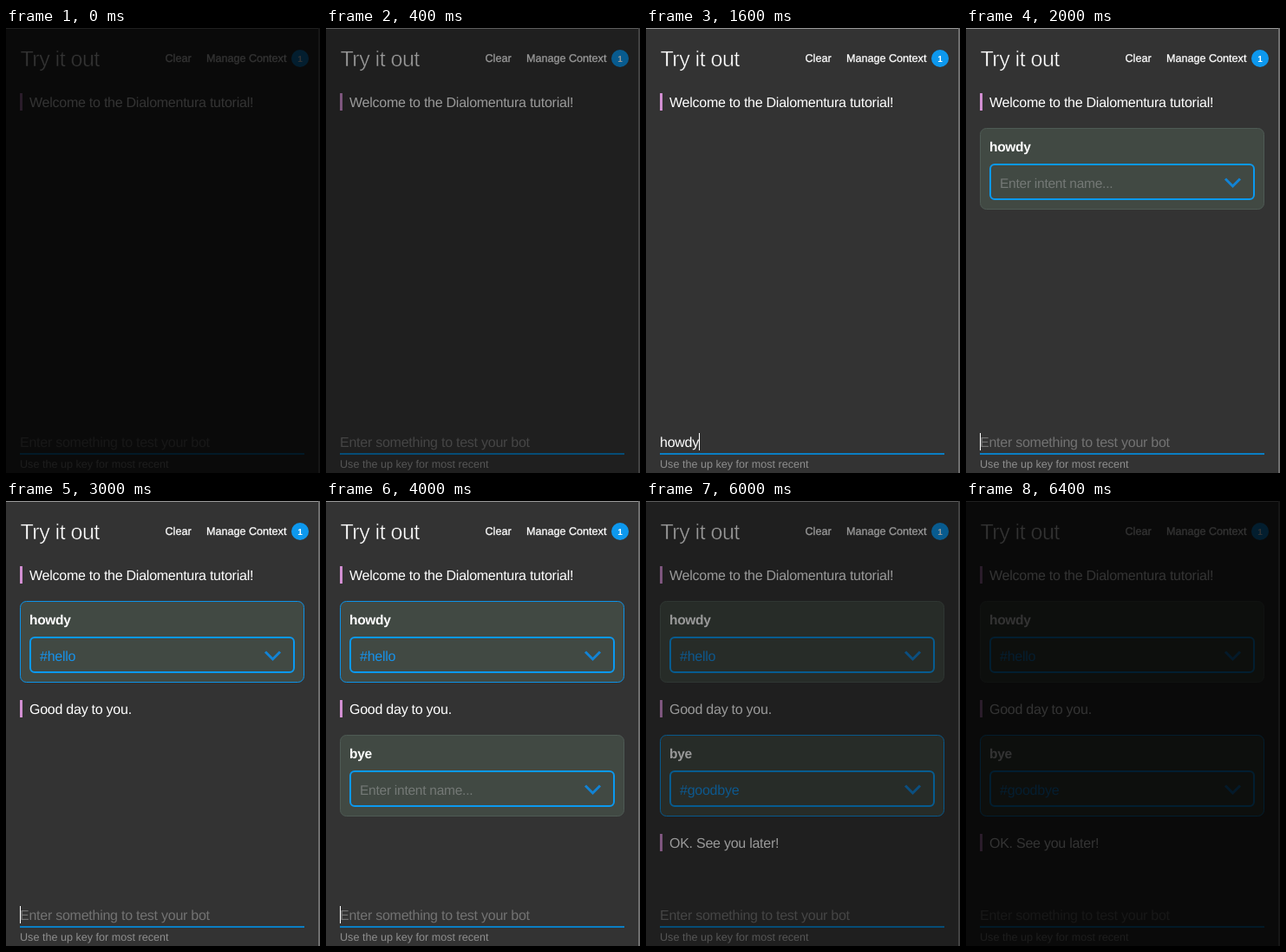
Write an HTML page that moves like this. It is 362x512 px and loops after 6600 ms.

```html
<!DOCTYPE html>
<html lang="en">
<head>
<meta charset="utf-8">
<title>Try it out</title>
<style>
  html, body { margin: 0; width: 100%; height: 100%; overflow: hidden; background: #000; }
  svg { display: block; width: 362px; height: 512px; }
  text {
    font: 16px "Liberation Sans", Arial, sans-serif;
    letter-spacing: -.25px;
    text-rendering: geometricPrecision;
    fill: #fff;
    white-space: pre;
  }
  .title { font-size: 25px; letter-spacing: -.5px; stroke: #333; stroke-width: .5px; }
  .link { font-size: 12.6px; letter-spacing: 0; stroke: #fff; stroke-width: .3px; }
  .badge { font-size: 10px; font-weight: bold; letter-spacing: 0; text-anchor: middle; }
  .said { font-size: 15.5px; font-weight: bold; letter-spacing: -.3px; }
  .hint { font-size: 12.6px; letter-spacing: 0; fill: #8e8e8e; }
  .ghost { fill: #727272; }
  .ask { font-size: 15.5px; fill: #747976; }
  .intent { fill: #1692ea; }
  .bar { fill: #d28fd2; }
  .card { fill: #414943; stroke: #4e5a54; }
  .card.on { stroke: #0d93e8; }
  .box { fill: none; stroke: #0b99ef; stroke-width: 2; }
  .arrow { fill: none; stroke: #1283d4; stroke-width: 3; }
</style>
</head>
<body>
<svg viewBox="0 0 362 512">
  <rect width="362" height="512" fill="#333"/>
  <rect width="362" height="1" fill="#9a9a9a"/>
  <rect x="360" width="2" height="512" fill="#707070"/>
  <text class="title" x="16.5" y="44">Try it out</text>
  <text class="link" x="183.5" y="39">Clear</text>
  <text class="link" x="231" y="39">Manage Context</text>
  <circle cx="339" cy="35" r="10" fill="#0d98ee"/>
  <text class="badge" x="339" y="38.7">1</text>
  <g id="chat"></g>
  <text class="ghost" id="ghost" x="16" y="482">Enter something to test your bot</text>
  <text id="typed" x="16" y="482"></text>
  <rect id="caret" y="466" width="1" height="20" fill="#fff"/>
  <rect x="16" y="489" width="328" height="2" fill="#0a7ec4"/>
  <text class="hint" x="16" y="506">Use the up key for most recent</text>
  <rect id="shade" width="362" height="512"/>
</svg>
<script>
const LOOP = 6600;
const $ = id => document.getElementById(id);
const chat = $('chat'), ghost = $('ghost'), typed = $('typed'), caret = $('caret'), shade = $('shade');

// [start ms, value], each held until the next
const light = [[0, .2], [200, .4], [400, .6], [600, .8], [800, 1],
               [5800, .8], [6000, .6], [6200, .4], [6400, .2]];
const input = [[0, ''], [1200, 'h'], [1400, 'how'], [1600, 'howdy'], [2000, ''],
               [3400, 'b'], [3600, 'by'], [3800, 'bye'], [4000, '']];
const blink = [[0, 0], [1200, 1], [2600, 0], [3000, 1], [4600, 0], [5200, 1], [5600, 0]];
const turns = [
  { y: 115, said: 'howdy', intent: '#hello', reply: 'Good day to you.', asked: 2000, answered: 2800, dimmed: 4400 },
  { y: 269, said: 'bye', intent: '#goodbye', reply: 'OK. See you later!', asked: 4000, answered: 4400, dimmed: LOOP }
];

const at = (steps, t) => steps.reduce((v, s) => t >= s[0] ? s[1] : v, steps[0][1]);
const show = (el, on) => el.setAttribute('visibility', on ? 'visible' : 'hidden');

function group(html) {
  const g = document.createElementNS('http://www.w3.org/2000/svg', 'g');
  g.innerHTML = html;
  return chat.appendChild(g);
}

const message = (y, text) => group(
  `<rect class="bar" x="16" y="${y}" width="3" height="20"/><text x="27" y="${y + 16}">${text}</text>`);

message(75, 'Welcome to the Dialomentura tutorial!');

for (const turn of turns) {
  const { y } = turn;
  turn.panel = group(
    `<rect class="card" x="16.5" y="${y + .5}" width="327" height="93" rx="7"/>
     <text class="said" x="27" y="${y + 27}">${turn.said}</text>
     <rect class="box" x="28" y="${y + 42}" width="304" height="40" rx="5"/>
     <path class="arrow" d="M299 ${y + 58.5}l8.5 8.5l8.5 -8.5"/>
     <text x="39" y="${y + 69}"></text>`);
  turn.card = turn.panel.querySelector('.card');
  turn.field = turn.panel.lastElementChild;
  turn.answer = message(y + 114, turn.reply);
}

function draw(t) {
  const text = at(input, t);
  typed.textContent = text;
  show(ghost, !text);
  show(caret, at(blink, t));
  caret.setAttribute('x', text ? Math.round(16 + typed.getComputedTextLength()) : 16);

  for (const turn of turns) {
    const done = t >= turn.answered;
    show(turn.panel, t >= turn.asked);
    show(turn.answer, done);
    turn.card.classList.toggle('on', done && t < turn.dimmed);
    turn.field.textContent = done ? turn.intent : 'Enter intent name...';
    turn.field.setAttribute('class', done ? 'intent' : 'ask');
  }
  shade.setAttribute('opacity', 1 - at(light, t));
}

function tick() {
  draw(performance.now() % LOOP);
  requestAnimationFrame(tick);
}
tick();
</script>
</body>
</html>
```
